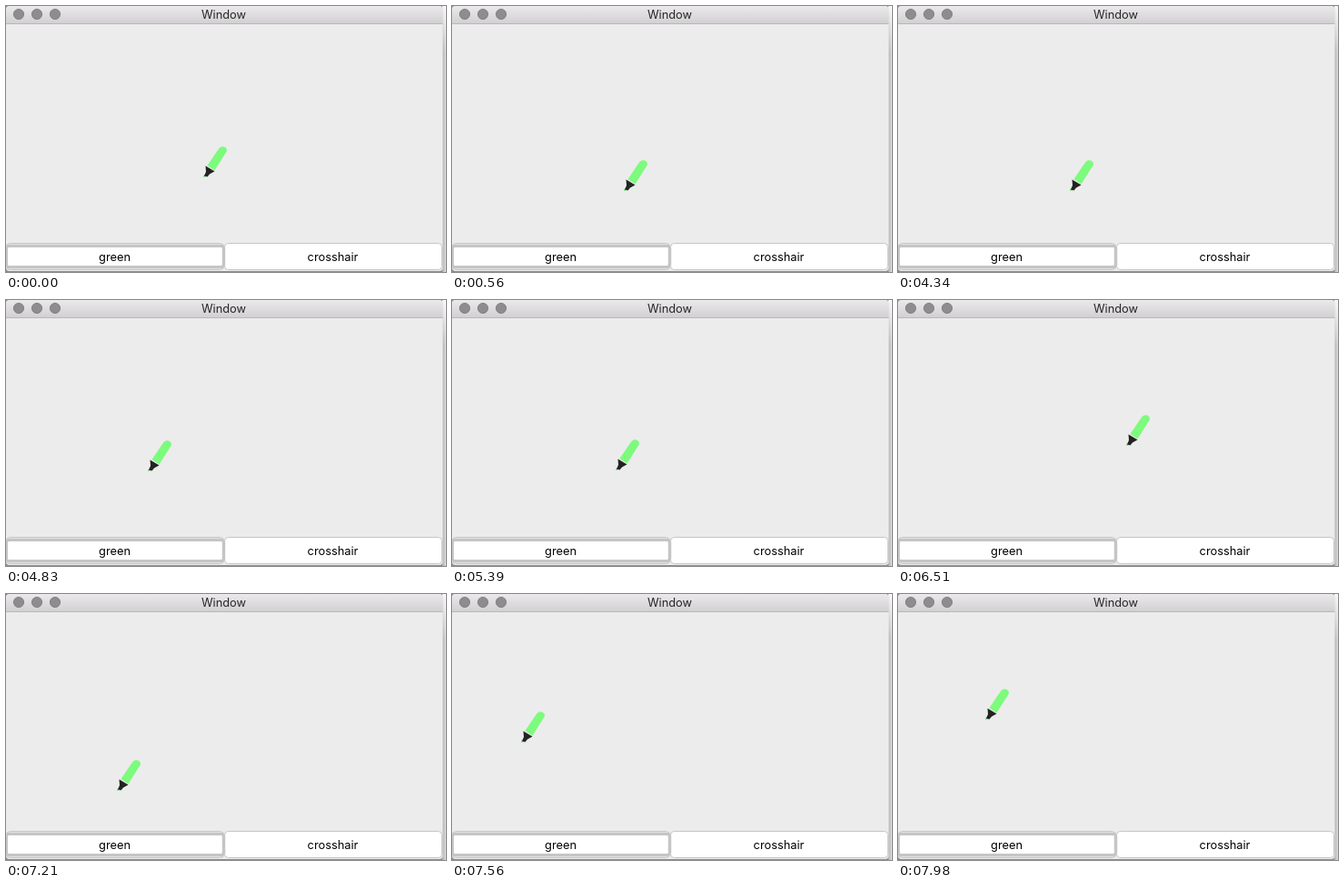
These frames come from a looping animation (484x292 px, 8 s). An HTML page:

```html
<!DOCTYPE html>
<html lang="en">
<head>
<meta charset="utf-8">
<title>Window</title>
<style>
  html, body { margin: 0; width: 100%; height: 100%; overflow: hidden; background: #ececec; }
  svg { display: block; width: 100vw; height: 100vh; }
  text { font: 12.8px Inter, "Open Sans", sans-serif; text-anchor: middle; fill: #000; }
  .title { fill: #262626; }
  .button { fill: #fff; stroke: #c5c5c5; }
</style>
</head>
<body>
<svg viewBox="0 0 484 292">
  <defs>
    <linearGradient id="bar" x2="0" y2="1">
      <stop stop-color="#ebe9eb"/><stop offset="1" stop-color="#d2d0d2"/>
    </linearGradient>
    <linearGradient id="shade">
      <stop stop-color="#adadad"/><stop offset="1" stop-color="#dedede"/>
    </linearGradient>
    <linearGradient id="glow" x2="0" y2="1">
      <stop stop-color="#fff" stop-opacity=".85"/><stop offset="1" stop-color="#fff" stop-opacity="0"/>
    </linearGradient>
  </defs>

  <rect width="484" height="292" fill="#8c8c8c"/>
  <rect x="480" width="4" height="292" fill="url(#shade)"/>
  <rect x="480" width="4" height="50" fill="url(#glow)"/>
  <rect width="480.5" height="291" rx="4" fill="#ececec"/>
  <path d="M0 19V4Q0 0 4 0H476Q480.500 0 480.500 4V19Z" fill="url(#bar)"/>
  <rect y="19" width="480.5" height="1" fill="#b9b8b9"/>
  <g fill="#8e8d8e" stroke="#777" stroke-width=".8">
    <circle cx="14" cy="9" r="5.6"/><circle cx="34" cy="9" r="5.6"/><circle cx="54" cy="9" r="5.6"/>
  </g>
  <text class="title" x="239.5" y="14">Window</text>

  <rect class="button" x=".5" y="260.5" width="239" height="29" rx="4"/>
  <rect class="button" x="240.5" y="260.5" width="239" height="29" rx="4"/>
  <rect class="button" x=".3" y="263.3" width="239.2" height="23.4" rx="3" stroke-width="3.5"/>
  <text x="119.5" y="280">green</text>
  <text x="359.5" y="280">crosshair</text>

  <g id="marker">
    <path d="M4.500-13 17.500-32Q20.500-35 24-33 27-30.500 25.500-28L12.500-7.500Z" fill="#7cfb7c"/>
    <path d="M0 0 1-3 4-1Z" fill="#5fd468"/>
    <path d="M2.500-12.500 12.500-6.500 7-3.500 4.500-.5 1-1.500 3-6Z" fill="#232323"/>
  </g>
</svg>
<script>
  const LOOP = 8000, STEP = 70;
  const ARRIVE = 350, LEAVE = 4340;
  const SPACING = 420, FIRST_KNOT = 4270;
  const marker = document.getElementById("marker");

  // Evenly timed knots of the nib's path; the outer two only steer the curve.
  const knots = [
    [180, 200], [193, 203], [156, 196], [167, 174], [191, 195], [253, 209],
    [251, 168], [237, 159], [122, 216], [73, 154], [101, 136], [120, 130]
  ];

  function catmullRom(a, b, c, d, u) {
    return b + u / 2 * (c - a + u * (2 * a - 5 * b + 4 * c - d + u * (3 * (b - c) + d - a)));
  }

  function nibAt(t) {
    const place = (Math.max(t, LEAVE) - FIRST_KNOT) / SPACING;
    const i = Math.floor(place);
    const [a, b, c, d] = knots.slice(i, i + 4);
    const approach = Math.max(0, 1 - t / ARRIVE) ** 2;
    const along = axis => catmullRom(a[axis], b[axis], c[axis], d[axis], place - i);
    return [along(0) + 28 * approach, along(1) - 15 * approach].map(Math.round);
  }

  function tick() {
    const t = Math.floor((performance.now() - start) % LOOP / STEP) * STEP;
    marker.setAttribute("transform", `translate(${nibAt(t)})`);
    requestAnimationFrame(tick);
  }

  const start = performance.now();
  tick();
</script>
</body>
</html>
```
